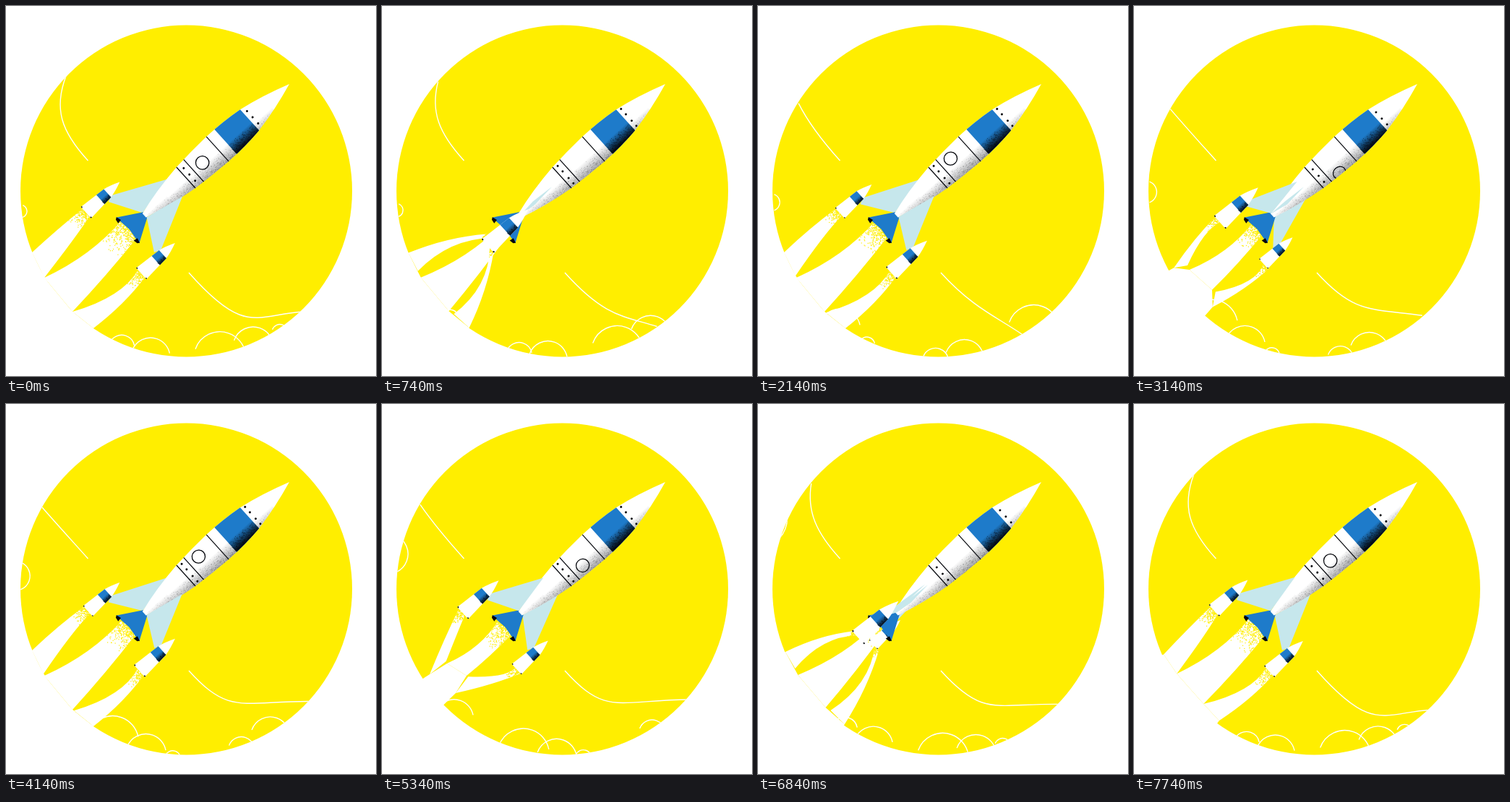
Write an HTML page with a canvas that moves like this. It is 512x512 px and loops after 7840 ms.

```html
<!DOCTYPE html>
<html lang="en">
<head>
<meta charset="utf-8">
<title>Rocket</title>
<style>
html, body { margin: 0; width: 100%; height: 100%; overflow: hidden; background: #fff; }
canvas { display: block; width: 512px; height: 512px; }
</style>
</head>
<body>
<canvas id="stage" width="512" height="512"></canvas>
<script>
const ctx = document.getElementById('stage').getContext('2d');
const LOOP = 7840, SPIN = 2000, TURN = 1500;
const YELLOW = '#ffee00', BLUE = '#1e7bca', PALE = '#c6e7ec', INK = '#05070c', WHITE = '#fff';
const DISC = { x: 249.5, y: 256, r: 229.5 };

// Rocket space: x runs from nose to tail, y across the body.
const NOSE = [392, 108], AX = [-.741, .671], AY = [.671, .741];
const place = (x, y) => [NOSE[0] + AX[0] * x + AY[0] * y, NOSE[1] + AX[1] * x + AY[1] * y];

const mix = (a, b, k) => a.map((v, i) => v + (b[i] - v) * k);
const add = (p, q, k = 1) => [p[0] + q[0] * k, p[1] + q[1] * k];
const bell = (d, width) => Math.exp(-((d / width) ** 2));
// Rises to 1 once per loop, at the given time.
const swell = (t, peak, power) => (.5 + .5 * Math.cos((t - peak) / LOOP * 2 * Math.PI)) ** power;

function random(seed) {
  return () => {
    seed = (seed * 1664525 + 1013904223) >>> 0;
    return seed / 4294967296;
  };
}

function poly(points, color) {
  ctx.beginPath();
  points.forEach(p => ctx.lineTo(p[0], p[1]));
  ctx.closePath();
  ctx.fillStyle = color;
  ctx.fill();
}

function dot(x, y, r, color) {
  ctx.beginPath();
  ctx.arc(x, y, r, 0, 7);
  ctx.fillStyle = color;
  ctx.fill();
}

function wind(x, y, curve) {
  ctx.beginPath();
  ctx.moveTo(x, y);
  ctx.bezierCurveTo(...curve);
  ctx.stroke();
}

function cloud(x, y, r, from, to) {
  ctx.beginPath();
  ctx.arc(x, y, r, from, to);
  ctx.stroke();
}

function drawSky(t) {
  ctx.save();
  dot(DISC.x, DISC.y, DISC.r, YELLOW);
  ctx.clip();
  ctx.strokeStyle = WHITE;
  ctx.lineWidth = 1.4;

  wind(113.5, 214, mix([92, 190, 71, 167, 50, 143], [76, 173, 66, 142, 83, 97], swell(t, 0, 2)));
  const right = mix([310, 432, 325, 410, 424, 409], [295, 415, 330, 433, 355, 462], swell(t, 1440, 2));
  const dip = swell(t, 0, 12);
  wind(253, 369, mix(right, [330, 456, 345, 428, 410, 423], dip));

  // Clouds slide to the right along the bottom rim.
  for (const [x0, r] of [[28, 28], [65, 11], [160, 18], [200, 27], [296, 36]]) {
    const x = 90 + (x0 + 224 + t * .04) % 314;
    const rim = Math.sqrt(Math.max(0, DISC.r ** 2 - (x - DISC.x) ** 2));
    cloud(x, DISC.y + rim + 6, r, -2.8, -.2);
  }
  const k = (t / LOOP) ** 2;
  cloud(20 - 25 * k, 284 - 165 * k, 9 + 40 * k, -1.2, 1.2);
  ctx.restore();
}

function trail(x, y, half, endA, endB, bendA, bendB, rnd) {
  const a = place(x, y - half), b = place(x, y + half);
  ctx.beginPath();
  ctx.moveTo(...a);
  ctx.quadraticCurveTo(...add(mix(a, endA, .5), bendA), ...endA);
  ctx.lineTo(...endB);
  ctx.quadraticCurveTo(...add(mix(b, endB, .5), bendB), ...b);
  ctx.fillStyle = WHITE;
  ctx.fill();
  ctx.save();
  ctx.clip();
  ctx.fillStyle = YELLOW;
  const reach = 16 + half * 1.6;
  for (let i = 0; i < half * 26; i++) {
    const p = place(x + reach * rnd() * rnd(), y + (rnd() * 2 - 1) * half * 1.3);
    ctx.fillRect(p[0], p[1], 1.2, 1.2);
  }
  ctx.restore();
}

function drawSmoke(t, pods, side) {
  const pull = bell(t % SPIN - 1340, 300);
  // Upper edge, two notches, lower edge: spread out and pulled together.
  const a = mix([36, 341], [66, 374], pull);
  const w1 = mix([53, 376], [90, 359], pull);
  const w2 = mix([92, 423], [117, 376], pull);
  const b = mix([121, 446], [102, 400], pull);
  const out = p => mix([DISC.x, DISC.y], p, 1.25);
  poly([a, w1, w2, b, out(b), out(a)], WHITE);

  const rnd = random(Math.floor(t) + 7);
  const [up, low] = pods.slice().sort((p, q) => p.y - q.y);
  const half = 7 - 3 * side, shift = 7 * side;
  trail(299, 0, 16 - 8 * side, w1, w2, [12, 9], [2, 2], rnd);
  trail(up.x + 62 * up.size, up.y - shift, half, a, add(w1, [-4, -9], side),
    [0, -2 - 7 * side], mix([12, -13], [-6, -22], side), rnd);
  trail(low.x + 62 * low.size, low.y + shift, half, add(w2, [7, 4], side), b,
    [24, 9], [8, 2], rnd);
}

function bodyPath() {
  ctx.beginPath();
  for (const s of [-1, 1]) {
    ctx.moveTo(0, 0);
    ctx.quadraticCurveTo(38, 13 * s, 74, 19.5 * s);
    ctx.quadraticCurveTo(104, 23.5 * s, 134, 23 * s);
    ctx.quadraticCurveTo(165, 22 * s, 193, 19.5 * s);
    ctx.quadraticCurveTo(236, 14 * s, 271, 3.5 * s);
    ctx.lineTo(271, 0);
  }
}

// Soft shadow with a fine grain, darkest at y1.
function shade(x0, x1, y0, y1, dark, rnd) {
  const g = ctx.createLinearGradient(0, y0, 0, y1);
  g.addColorStop(0, 'rgba(5,7,12,0)');
  g.addColorStop(1, `rgba(5,7,12,${dark})`);
  ctx.fillStyle = g;
  ctx.fillRect(x0, y0, x1 - x0, y1 - y0 + 4);
  ctx.fillStyle = `rgba(5,7,12,${dark * .7})`;
  const grains = (x1 - x0) * (y1 - y0) * .3;
  for (let i = 0; i < grains; i++) {
    ctx.fillRect(x0 + (x1 - x0) * rnd(), y0 + (y1 - y0) * Math.sqrt(rnd()), .8, .8);
  }
}

function drawBody(turn) {
  const rnd = random(42);
  ctx.save();
  bodyPath();
  ctx.fillStyle = WHITE;
  ctx.fill();
  ctx.clip();
  ctx.fillStyle = BLUE;
  ctx.fillRect(74, -30, 45, 60);
  shade(74, 119, 4, 21, .95, rnd);
  shade(40, 74, 8, 19, .2, rnd);
  shade(119, 193, 4, 23, .35, rnd);
  shade(193, 230, 3, 18, .3, rnd);
  shade(230, 268, 1, 12, .2, rnd);
  ctx.fillStyle = INK;
  for (const x of [134, 178.5, 193]) ctx.fillRect(x - .6, -30, 1.2, 60);
  for (let i = 0; i < 10; i++) {
    const a = turn + i * Math.PI / 5;
    if (Math.cos(a) < .53) continue;
    dot(68.5, Math.sin(a) * 19.5, 1.5, INK);
    dot(186.5, Math.sin(a) * 20, 1.5, INK);
  }
  // A porthole on each side of the hull.
  for (const a of [turn, turn + Math.PI]) {
    if (Math.cos(a) < .1) continue;
    ctx.beginPath();
    ctx.ellipse(162.3, Math.sin(a) * 27, 9.2, 9.2 * Math.sqrt(Math.cos(a)), 0, 0, 7);
    ctx.strokeStyle = INK;
    ctx.lineWidth = 1.3;
    ctx.stroke();
  }
  ctx.restore();
}

function drawNozzle() {
  poly([[269, -4.5], [302, -24], [299, 0], [302, 24], [269, 4.5]], BLUE);
  for (const s of [-1, 1]) poly([[301, 24 * s], [304, 22 * s], [305, 16 * s], [299, 17 * s]], INK);
}

function drawFin(pod) {
  const k = pod.y / 57, push = pod.x - 265;
  poly([[214, 16 * k], [286 + push, 51 * k], [295 + push, 47 * k], [270, 4 * k]], PALE);
  if (pod.depth > .5) poly([[212, 0], [245, -2.5], [272, k * 4], [245, 2.5]], PALE);
}

function drawPod(pod) {
  ctx.save();
  ctx.translate(pod.x, pod.y);
  ctx.scale(pod.size, pod.size);
  ctx.beginPath();
  ctx.moveTo(0, 0);
  ctx.quadraticCurveTo(13, 5.5, 23, 7.5);
  ctx.lineTo(63, 10.5);
  ctx.lineTo(63, -10.5);
  ctx.lineTo(23, -7.5);
  ctx.quadraticCurveTo(13, -5.5, 0, 0);
  ctx.fillStyle = WHITE;
  ctx.fill();
  ctx.clip();
  ctx.fillStyle = BLUE;
  ctx.fillRect(23, -12, 13, 24);
  shade(23, 36, 0, 8, .9, random(5));
  for (const s of [-1, 1]) dot(63, 10 * s, 1.6, INK);
  ctx.restore();
}

function draw(ms) {
  // The picture advances ten times a second.
  const now = ms % LOOP;
  const t = now < 40 ? 0 : 40 + Math.floor((now - 40) / 100) * 100;
  const turn = -Math.PI * Math.min(1, (t % SPIN) / TURN);
  const pods = [-1, 1].map(s => {
    const depth = -s * Math.sin(turn);
    return { x: 265 - 8 * depth, y: 57 * s * Math.cos(turn), depth, size: 1 + .2 * depth };
  });
  const [back, front] = pods.slice().sort((a, b) => a.depth - b.depth);

  ctx.setTransform(1, 0, 0, 1, 0, 0);
  ctx.fillStyle = WHITE;
  ctx.fillRect(0, 0, 512, 512);
  drawSky(t);
  drawSmoke(t, pods, Math.abs(Math.sin(turn)));

  ctx.setTransform(...AX, ...AY, ...NOSE);
  drawFin(back);
  drawPod(back);
  drawNozzle();
  drawBody(turn);
  drawFin(front);
  drawPod(front);
}

const start = performance.now();
function loop() {
  draw(performance.now() - start);
  requestAnimationFrame(loop);
}
loop();
</script>
</body>
</html>
```
